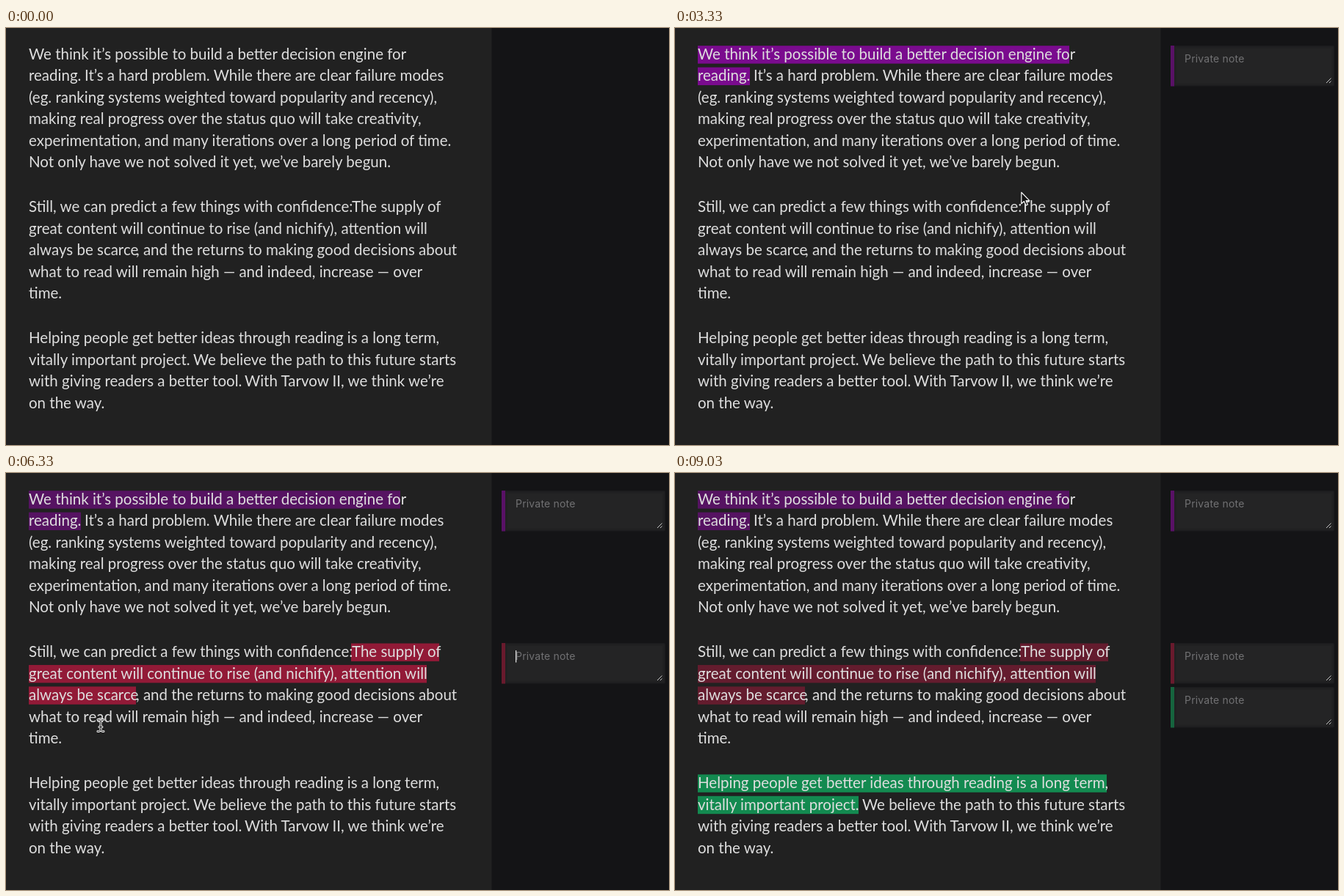
These frames come from a looping animation (903 px wide and 569 px high, 9.33 s). An HTML page:

```html
<!DOCTYPE html>
<html lang="en">
<head>
<meta charset="utf-8">
<title>Highlights and notes</title>
<style>
  html, body { margin: 0; width: 100%; height: 100%; overflow: hidden; background: #141416; }
  svg { display: block; width: 100%; height: 100%; }
  .copy { font: 20.5px Lato, sans-serif; fill: #dedede; white-space: pre; }
  .hint { font: 14px Inter, sans-serif; letter-spacing: .2px; fill: #717173; }
</style>
</head>
<body>
<svg id="stage" viewBox="0 0 903 569">
  <rect width="903" height="569" fill="#141416"/>
  <rect width="661.5" height="569" fill="#212121"/>
  <g id="marks"></g>
  <g id="selection" fill="#5b7da8"></g>
  <g id="copy" class="copy"></g>
  <g id="notes"></g>
  <g id="pointer" stroke-linejoin="round" stroke-linecap="round">
    <g id="beam" fill="none">
      <path d="M-4 -8Q-1 -8 0 -6Q1 -8 4 -8M0 -6V6M-4 8Q-1 8 0 6Q1 8 4 8M-2 2H2" stroke="#f4f4f4" stroke-width="3"/>
      <path d="M-4 -8Q-1 -8 0 -6Q1 -8 4 -8M0 -6V6M-4 8Q-1 8 0 6Q1 8 4 8M-2 2H2" stroke="#111" stroke-width="1"/>
    </g>
    <path id="arrow" d="M0 0V15.5L3.6 12.2 6.2 17.8 8.6 16.7 6.2 11.3H11Z" fill="#111" stroke="#f4f4f4" stroke-width="1.2"/>
    <path id="hand" d="M-1.7 8V.6Q-1.6 -.8 -.4 -.8Q.8 -.8 1 .6V5Q2.4 3.8 3.5 5.5Q5 4.6 6 6.3Q8.2 5.6 8.2 8V11Q8 13 6.7 14.5V16H-.6V14.8L-4.5 9.6Q-5.6 7.8 -4.2 7.2Q-3 6.8 -1.7 8ZM1.6 10V13M3.6 10V13M5.6 10V13" fill="#f6f6f6" stroke="#111" stroke-width="1"/>
  </g>
</svg>
<script>
const LOOP = 9330, LEFT = 31, ROW = 29.45;
const $ = id => document.getElementById(id);

function el(parent, tag, attrs = {}, text = '') {
  const node = document.createElementNS('http://www.w3.org/2000/svg', tag);
  for (const key in attrs) node.setAttribute(key, attrs[key]);
  node.textContent = text;
  return parent.appendChild(node);
}
const clamp = v => Math.max(0, Math.min(1, v));
const baseline = i => 43 + ROW * i + 31.6 * ((i > 5) + (i > 10));
const rowTop = i => baseline(i) - 21.3;

// A number inside a line starts a new run at that x.
const lines = [
  ['We think it’s possible to build a better decision engine for'],
  ['reading.', 107, 'It’s a hard problem. While there are clear failure modes'],
  ['(eg. ranking systems weighted toward popularity and recency),'],
  ['making real progress over the status quo will take creativity,'],
  ['experimentation, and many iterations over a long period of time.'],
  ['Not only have we not solved it yet, we’ve barely begun.'],
  ['Still, we can predict a few things with confidence:', 471, 'The supply of'],
  ['great content will continue to rise (and nichify), attention will'],
  ['always be scarce', 177, ', and the returns to making good decisions about'],
  ['what to read will remain high — and indeed, increase — over'],
  ['time.'],
  ['Helping people get better ideas through reading is a long term,'],
  ['vitally important project.', 255, 'We believe the path to this future starts'],
  ['with giving readers a better tool.', 325, 'With Tarvow II, we think we’re'],
  ['on the way.']
];
lines.forEach((line, i) => {
  let x = LEFT;
  for (const part of line) {
    if (typeof part === 'number') x = part;
    else el($('copy'), 'text', { x, y: baseline(i) }, part);
  }
});

// down / up: mouse button times; blur: when the note loses focus
const marks = [
  { color: '#7a0b8e', row: 0, spans: [[31, 537], [31, 102]], noteY: 24, down: 1170, up: 1700, blur: 4100 },
  { color: '#921a37', row: 6, spans: [[470, 590], [31, 573], [31, 177]], noteY: 232, down: 4100, up: 5000, blur: 7400 },
  { color: '#138a50', row: 11, spans: [[31, 588], [31, 250]], noteY: 292, down: 7400, up: 8500, blur: LOOP }
];

for (const m of marks) {
  m.ink = el($('marks'), 'g', { fill: m.color });
  m.spans.forEach(([a, b], i) =>
    el(m.ink, 'rect', { x: a, y: baseline(m.row + i) - 18.8, width: b - a, height: 24.4 }));

  m.note = el($('notes'), 'g');
  const box = (x, y, width, height, fill, more) =>
    el(m.note, 'rect', { x, y, width, height, fill, ...more });
  box(675, 0, 223, 55.5, '#1c1c1e', { rx: 2 });
  box(680, 1.5, 216.5, 52.5, '#212122');
  box(683, 4, 211, 47.5, '#242425');
  box(675, 0, 5, 55.5, m.color, { opacity: .65 });
  el(m.note, 'text', { class: 'hint', x: 694, y: 22.5 }, 'Private note');
  el(m.note, 'path', { d: 'M887 51L893.5 44.5M891 51L893.5 48.5', stroke: '#c8c8c8', 'stroke-width': 1 });
  m.caret = box(694, 10, 1.2, 16.5, '#e6e6e6');
}

const bands = [0, 1, 2].map(() => el($('selection'), 'rect', { x: LEFT, height: ROW + .3 }));

// time, x, y of the pointer
const path = [
  [30, 565, 478], [870, 32, 31], [1170, 32, 31], [1600, 66, 61], [2400, 66, 61],
  [3150, 440, 208], [4000, 470, 240], [4100, 470, 240], [4270, 432, 258],
  [4800, 160, 309], [5640, 160, 309], [6330, 129, 344.5], [6600, 108, 386],
  [7100, 63, 425], [7270, 63, 425], [7400, 33, 424], [7970, 162, 442],
  [8170, 217, 454], [8270, 220, 455], [8500, 220, 455]
];

// Slope at a key; zero at rests and at both ends.
function slope(i, k) {
  const a = path[i - 1], b = path[i], c = path[i + 1];
  if (!a || !c) return 0;
  const still = (p, q) => p[1] === q[1] && p[2] === q[2];
  return still(a, b) || still(b, c) ? 0 : (c[k] - a[k]) / (c[0] - a[0]);
}

function pointerAt(t) {
  let i = 0;
  while (i < path.length - 2 && t >= path[i + 1][0]) i++;
  const a = path[i], b = path[i + 1], span = b[0] - a[0];
  const u = clamp((t - a[0]) / span), v = 1 - u;
  return [1, 2].map(k =>
    a[k] * (1 + 2 * u) * v * v + b[k] * u * u * (3 - 2 * u) +
    span * u * v * (slope(i, k) * v - slope(i + 1, k) * u));
}

const show = (node, on) => node.setAttribute('visibility', on ? 'visible' : 'hidden');

function drawSelection(t) {
  const m = marks.find(m => t >= m.down && t < m.up);
  const [x, y] = pointerAt(t - 40);
  let last = m ? m.row : 0;
  while (m && last < m.row + m.spans.length - 1 && y >= rowTop(last + 1)) last++;
  bands.forEach((band, i) => {
    const row = m ? m.row + i : 0;
    const on = !!m && row <= last;
    show(band, on);
    if (!on) return;
    const [from, to] = m.spans[i];
    const end = row === last ? from + 9 * Math.round((x - from) / 9) : to + 4;
    band.setAttribute('x', Math.min(from, end));
    band.setAttribute('y', rowTop(row));
    band.setAttribute('width', Math.abs(end - from));
  });
}

function drawMark(m, t) {
  const age = t - m.up, live = age >= 0;
  const k = clamp(age / 300);
  show(m.ink, live);
  show(m.note, live);
  m.ink.setAttribute('opacity', k - .4 * clamp((t - m.blur) / 220));
  m.note.setAttribute('opacity', 1 - (1 - k) ** 3);
  m.note.setAttribute('transform', `translate(${20 * (1 - k) ** 3} ${m.noteY})`);
  show(m.caret, live && t < m.blur && age % 1060 < 530);
}

function pointerKind(t, y) {
  if (t >= 1700 && t < 2520 || t >= 5000 && t < 5760) return 'hand';
  if (t >= 4000 && t < 5000) return 'arrow';
  return y > 195 && y < 231 && t > 2400 || y > 376 && y < 408 && t > 5000 ? 'arrow' : 'beam';
}

function draw(t) {
  marks.forEach(m => drawMark(m, t));
  drawSelection(t);
  const [x, y] = pointerAt(t), kind = pointerKind(t, y);
  const on = t >= 30 && t < 8500;
  $('pointer').setAttribute('transform', `translate(${x} ${y})`);
  for (const id of ['beam', 'arrow', 'hand']) show($(id), on && id === kind);
}

const start = performance.now();
function tick() {
  draw((performance.now() - start) % LOOP);
  requestAnimationFrame(tick);
}
tick();
</script>
</body>
</html>
```
